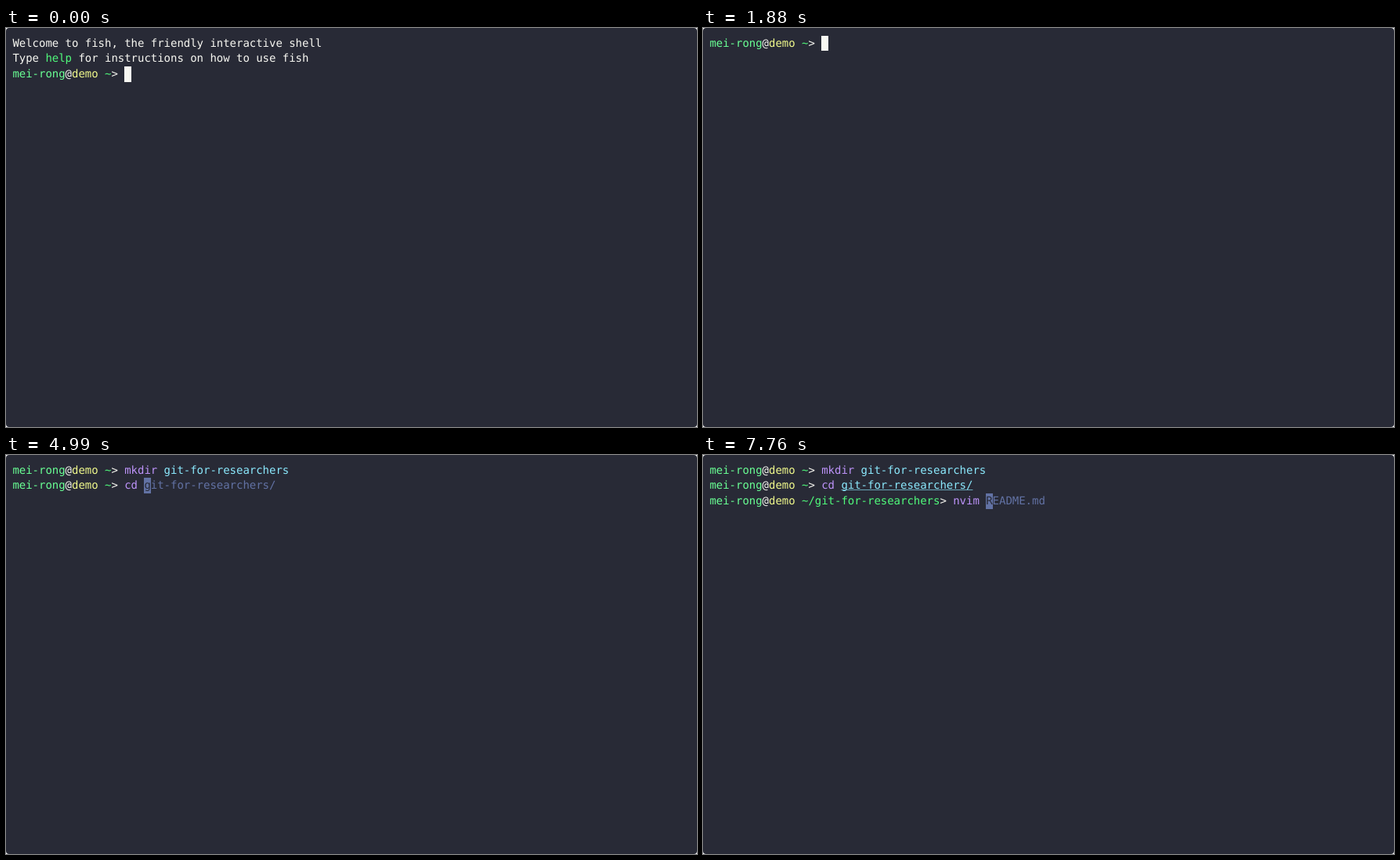
Recreate the animation shown at these times as an HTML page. Size 882 px wide and 509 px high, loop 8000 ms.

```html
<!DOCTYPE html>
<html lang="en">
<head>
<meta charset="utf-8">
<title>Terminal session</title>
<style>
  html, body { margin: 0; width: 100%; height: 100%; overflow: hidden; background: #fff; }
  svg { display: block; }
  text {
    font: 14px "DejaVu Sans Mono", monospace;
    font-variant-ligatures: none;
    white-space: pre;
    text-rendering: geometricPrecision;
  }
</style>
</head>
<body>
<svg width="882" height="509">
  <rect width="882" height="509" rx="4" fill="#282a36"/>
  <g id="screen"></g>
</svg>
<script>
const LOOP = 8000, CELL = 8.4, ROW = 19.6;
const bg = '#282a36', white = '#f8f8f2', green = '#50fa7b', user = '#69ff94', yellow = '#f1fa8c',
      purple = '#bd93f9', cyan = '#8be9fd', red = '#ff6e6e', grey = '#6272a4';
const screen = document.getElementById('screen');

const colX = col => (col + 1) * CELL;
const rowY = row => (row + 0.5) * ROW;

function add(tag, attrs, text = '') {
  const el = document.createElementNS('http://www.w3.org/2000/svg', tag);
  for (const key in attrs) el.setAttribute(key, attrs[key]);
  el.textContent = text;
  screen.append(el);
}

function write(text, col, row, fill) {
  const x = [...text].map((_, i) => colX(col + i).toFixed(2)).join(' ');
  add('text', { x, y: rowY(row) + 14, fill }, text);
}

function drawCursor(col, row, fill) {
  const x = Math.round(colX(col)), y = Math.round(rowY(row));
  add('rect', {
    x, y, fill,
    width: Math.round(colX(col + 1)) - x,
    height: Math.round(rowY(row + 1)) - y
  });
}

// A line is a list of [text, colour, style] runs.
function draw(lines) {
  screen.replaceChildren();
  lines.forEach((runs, row) => {
    let col = 0;
    for (const [text, color, style] of runs) {
      if (style === 'cursor') drawCursor(col, row, color);
      if (style === 'underline')
        add('rect', { x: colX(col), y: rowY(row) + 14.6, width: text.length * CELL, height: 0.65, fill: color });
      write(text, col, row, style === 'cursor' ? bg : color);
      col += text.length;
    }
  });
}

const prompt = (path = '') => [
  ['mei-rong', user], ['@', white], ['demo', yellow], [' ', white], ['~' + path, green], ['> ', white]
];
const cursor = [' ', white, 'cursor'];
const hint = text => [[text[0], grey, 'cursor'], [text.slice(1), grey]];

// The first n characters are typed, the rest is the suggestion.
const typing = (command, n, color = red) =>
  [[command.slice(0, n), color], ...hint(command.slice(n))];

const dir = 'git-for-researchers', cd = `cd ${dir}/`, edit = 'nvim README.md';
const welcome = [
  [['Welcome to fish, the friendly interactive shell', white]],
  [['Type ', white], ['help', green], [' for instructions on how to use fish', white]]
];
const made = [...prompt(), ['mkdir', purple], [' ', white], [dir, cyan]];
const moved = [...prompt(), ['cd', purple], [' ', white], [dir + '/', cyan, 'underline']];

const first = (...runs) => [...welcome, [...prompt(), ...runs]];
const second = (...runs) => [[...prompt(), ...runs]];
const third = (...runs) => [made, [...prompt(), ...runs]];
const fourth = (...runs) => [made, moved, [...prompt('/' + dir), ...runs]];

const steps = [
  [0, first(cursor)],
  [1430, first(...typing('clear', 1))],
  [1540, first(...typing('clear', 2))],
  [1620, first(...typing('clear', 3))],
  [1700, first(...typing('clear', 4))],
  [1790, first(['clear', purple], cursor)],
  [1880, second(cursor)],
  [3290, second(...typing('mkdir ' + dir, 1))],
  [3440, second(...typing('mkdir ' + dir, 2))],
  [3540, second(...typing('mkdir ' + dir, 3))],
  [3900, [[...made, cursor]]],
  [4160, third(cursor)],
  [4830, third(...typing('clear', 1))],
  [4910, third(...typing(cd, 2, purple))],
  [4990, third(...typing(cd, 3, purple))],
  [5660, [made, [...moved, cursor]]],
  [5830, fourth(cursor)],
  [7240, fourth(...typing(edit, 1))],
  [7390, fourth(...typing(edit, 2))],
  [7440, fourth(...typing(edit, 3))],
  [7590, fourth(...typing(edit, 4, purple))],
  [7760, fourth(...typing(edit, 5, purple))]
];

let shown;
function tick() {
  const t = performance.now() % LOOP;
  const step = steps.findLast(([start]) => start <= t);
  if (step !== shown) draw((shown = step)[1]);
  requestAnimationFrame(tick);
}
tick();
</script>
</body>
</html>
```
